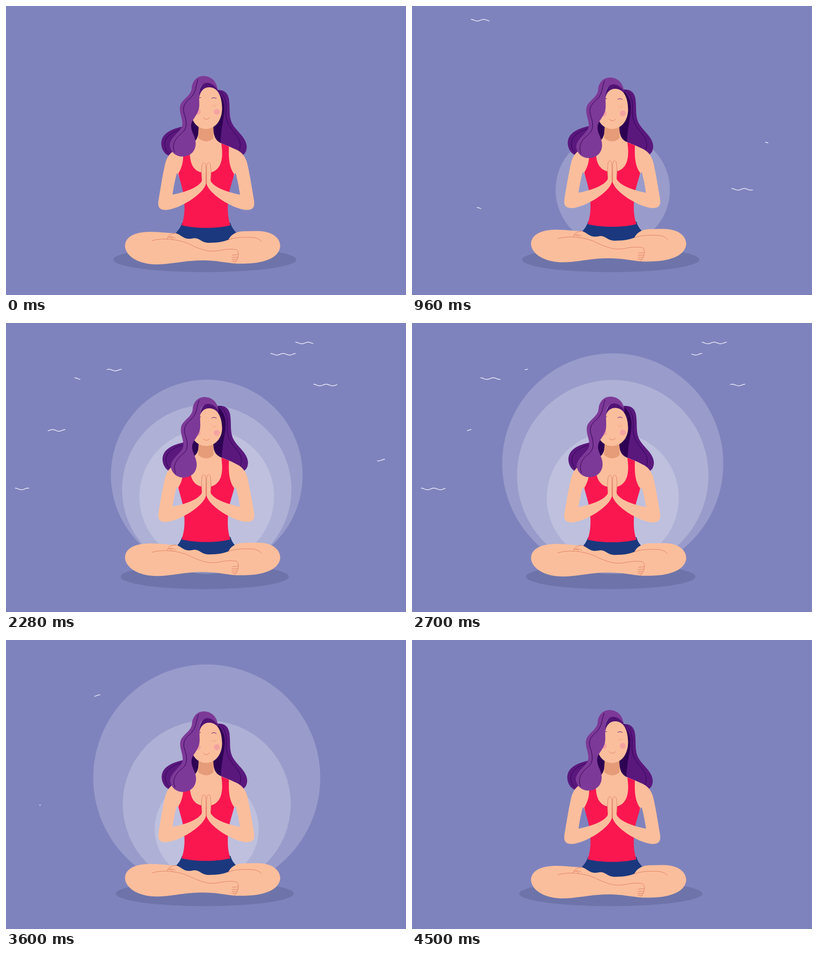
These frames come from a looping animation (795x576 px, 4.53 s). An HTML page:

```html
<!DOCTYPE html>
<html lang="en">
<head>
<meta charset="utf-8">
<title>Breathing meditation</title>
<style>
  html, body { margin: 0; width: 100%; height: 100%; overflow: hidden; background: #7f83bd; }
  svg { display: block; width: 100%; height: 100%; }
</style>
</head>
<body>
<svg id="stage" viewBox="0 0 795 576"></svg>
<script>
const LOOP = 4530, END = 4500;
const SKIN = '#fbbe9c', LINE = '#de8468', RED = '#fa1750', NAVY = '#1b387e';
const HAIR = '#7d3997', DEEP = '#5a187d', DARK = '#2e0253';

const stage = document.getElementById('stage');
const clamp = v => Math.max(0, Math.min(1, v));
const easeOut = v => Math.sin(clamp(v) * Math.PI / 2);

function add(tag, attrs) {
  const el = document.createElementNS('http://www.w3.org/2000/svg', tag);
  set(el, attrs);
  return stage.appendChild(el);
}
function set(el, attrs) {
  for (const name in attrs) el.setAttribute(name, attrs[name]);
}

const shadow = add('ellipse', { cx: 395, cy: 505.5, ry: 25, fill: '#6e74a9' });

// Halos grow from their lowest point, then collapse together at the end.
const halos = [[0, 134.5, 480], [750, 190.5, 494], [1500, 231, 500]].map(([start, size, base]) =>
  ({ start, size, base, el: add('circle', { cx: 399, fill: '#fff', 'fill-opacity': .2 }) })).reverse();

// Breeze lines: start x, y, start time and optional delay of the tail.
const breezes = [
  [117, 28.3, 444], [635, 365.3, 335], [702, 273.2, 885], [129, 403.2, 855, 400],
  [179, 93.8, 1102], [67, 214, 1176], [525.5, 62.3, 1400], [611, 123.6, 1526],
  [136, 110.8, 2133], [18, 330.7, 1910], [575, 39.8, 1787]
].map(([x, y, start, lag = 900]) => ({ x, y, start, lag,
  el: add('path', { fill: 'none', stroke: '#fff', 'stroke-width': 1.2 }) }));

function breezePath(b, t) {
  const age = t - b.start, head = 51 * easeOut(age / 1000), tail = 51 * easeOut((age - b.lag) / 1000);
  if (head - tail < .8) return '';
  const points = [];
  for (let d = tail; d < head + 1; d++) {
    const s = Math.min(d, head);
    points.push((b.x + s).toFixed(1) + ',' + (b.y - 1.6 * Math.cos(s / 51 * 4 * Math.PI)).toFixed(2));
  }
  return 'M' + points.join('L');
}

// Each part has a rule giving its displacement at full breath for any point.
const parts = [];
const part = (move, d, attrs) => parts.push({ move, d, el: add('path', attrs) });
const fill = (move, color, d, transform = '') => part(move, d, { fill: color, transform });
const line = (move, color, d, transform = '', width = 1) =>
  part(move, d, { fill: 'none', stroke: color, 'stroke-width': width, 'stroke-linecap': 'round', transform });

const MIRROR = 'matrix(-1 0 0 1 796 0)';
const still = () => [0, 0];
const backHair = () => [2.5, -2.5];
const frontHair = () => [2, 8];
const features = () => [0, 8];
const chest = (x, y) => [0, -5.7 * clamp((y - 245) / 25)];
const arm = (x, y) => [0, x < 430 ? -10 : -5 - 5 * clamp((y - 290) / 85)];
const legs = () => [0, -10.8];
const face = (x, y) => [0, 8 * clamp((235 - y) / 40)];

// Hair behind the body
fill(backHair, DEEP, 'M352,240 C330,245 309,253 308.5,274 C309,287 316,296 325,299 L350,295 L366,245Z');
line(backHair, DARK, 'M347,246 C324,253 313,265 316,280 C318,288 320,291 324,294');
fill(still, DARK, 'M372,222 L392,240 L388,272 L372,272 L362,245Z');
fill(backHair, DEEP, 'M417,168 C431,166 440,171 443,185 C446,205 442,220 450,235 C458,250 478,262 478.5,281 C478,290 475,295 469,298 L428,285 L408,260 L420,200Z');
fill(backHair, DARK, 'M417,168 C426,174 434,186 434,203 C434,225 427,240 426,278 C415,272 408,262 408,240 L420,200Z');
line(backHair, DARK, 'M421,168 C436,175 439,195 437,212 C437,250 470,255 465,283 L462,292');

// Torso
fill(chest, SKIN, 'M383,235 L412,235 C411,262 418,270 430,274.5 C446,281 460,286 470,297 C477,304 479,315 480,325 L455,334 L450,345 L398,350 L346,345 L341,334 L316,325 C317,315 320,303 327,296 C337,287 360,277 370,273 C379,269 384,260 383,235Z');
fill(chest, NAVY, 'M350,432 L446,432 C449,442 453,447 460,454 L450,480 L345,480 L335,455 C343,447 347,441 350,432Z');
fill(chest, RED, 'M352,296 C353,314 347,326 342.5,334 C345,346 351,362 353.5,380 C356,404 355,420 349,437 C376,444 420,444 446,437 C440,420 440,402 442,380 C445,362 451,346 453.5,335 C444,322 442,305 443,280 L428,274 C432,300 431,332 398,333 C371,332 366,314 365,290Z');

// Arms and joined hands
const armPath = 'M454.5,333 C447,318 445,300 448,283 C465,287 474,296 479,312 C484,332 489,364 493,388 C495,402 490,407 476,406.5 C448,403 403,374 398.5,354 L398.2,320 C399,310 405,310 406.5,318 C409,332 405,346 407.5,350 C415,362 440,371 465,376 C463,360 459,343 457,335 C456,332 455,332 454.5,333Z';
const handPath = 'M398.7,354 L398.7,322 C399,310 405,309 406.5,318 C408,330 407,337 407,344';
for (const side of ['', MIRROR]) fill(arm, SKIN, armPath, side);
for (const side of ['', MIRROR]) line(arm, LINE, handPath, side);

// Crossed legs
fill(legs, SKIN, 'M236.5,478 C237,460 256,450.5 286,450 C306,450 324,453 337,453 C346,454 352,464 363,464 C370,464 372,462 378,463 C387,465 390,472 404,472 C422,472 434,469 442,466 C446,458 454,450 470,449 L498,448.5 C526,448 545,460 545,479 C543,500 518,511 484,513 C471,513.5 462,514 452,513 C433,511 416,507 390,507 C355,507 328,515 300,515 C261,515 237,497 236.5,478Z');
line(legs, LINE, 'M290,468 C310,461 345,465 365,475 C392,488 407,491 425,487 C440,484 452,484 459,486 C465,491 461,509 453,513');
line(legs, LINE, 'M450,496.5 L461,495.5 M449,501 L461,500.5 M449,505 L459,505 M449,508.5 L457,509');
line(legs, LINE, 'M338,453 C329,453 322,457 320.5,464 M322,461 Q328,460 332,465 M325,460 Q332,459 337,463');
line(legs, LINE, 'M442,466 C458,460 474,461 485,461 C497,461 505,465 507.5,470');

// Head
fill(still, '#e69c78', 'M383,236 L412,236 L412.5,263 C405,272 391,272 382,263Z');
fill(frontHair, DEEP, 'M383,188 C382,165 390,151 402,151 C412,151 419,159 421,168 L412,182Z');
line(frontHair, DARK, 'M386,168 C391,155 404,150 417,166 M387,173 C392,159 402,155 413,165', '', .8);
fill(face, SKIN, 'M370,224 C375,238 385,245 398,245 C416,245 429.5,228 429.5,203 C429,178 420,162 404,162 C390,162 384,174 383,190Z');
fill(features, '#f5a3a2', 'M413,211 A6,6,0,1,1,425,211 A6,6,0,1,1,413,211Z M375,211 A6,6,0,1,1,387,211 A6,6,0,1,1,375,211Z');
line((x, y) => [0, y < 183 ? 4.5 : 6], DEEP, 'M409,183.5 Q414,181.5 418,184 M383,183 L387,182.5');
line(features, '#eda184', 'M409,196 Q413.5,203 418,196');
line(features, LINE, 'M392,222.5 Q398,229.5 404.5,222.5');
fill(frontHair, HAIR, 'M420.5,166 C418,148 406,139.5 392,139.5 C378,140 370,151 369,164 C368,178 353,184 347,196 C341,212 355,228 349,242 C342,254 325,264 325.5,279 C328,292 338,300 350,300 C366,300 377,290 377,274 C377,260 367,250 368,238 C369,225 383,217 384,200 C385,185 381,169 388,159 C396,148 411,152 420.5,166Z');
line(frontHair, DARK, 'M382,146 C376,160 379,171 366,184 C350,197 351,207 356,220 C363,247 352,250 343,259 C332,271 331,280 335,291');

function draw(now) {
  const t = now % LOOP;
  const breath = (1 - Math.cos(2 * Math.PI * t / END)) / 2;

  set(shadow, { rx: 182 - 15 * breath });
  for (const h of halos) {
    const peak = h.start + 1500;
    const fall = clamp((t - peak) / (END - peak)) ** 4.1;
    const r = h.size * easeOut((t - h.start) / 1500) * (1 - fall);
    set(h.el, { r, cy: h.base - r });
  }
  for (const b of breezes) set(b.el, { d: breezePath(b, t) });
  for (const { el, d, move } of parts) {
    // Arc radii and flags are followed by their end point, so only points move.
    set(el, { d: d.replace(/(A6,6,0,1,1,)?([\d.]+),([\d.]+)/g, (_, arc = '', x, y) => {
      const [dx, dy] = move(+x, +y);
      return arc + (+x + dx * breath).toFixed(2) + ',' + (+y + dy * breath).toFixed(2);
    }) });
  }
  requestAnimationFrame(loop);
}

let origin;
function loop(now) {
  origin ??= now;
  draw(now - origin);
}
draw(0);
</script>
</body>
</html>
```
